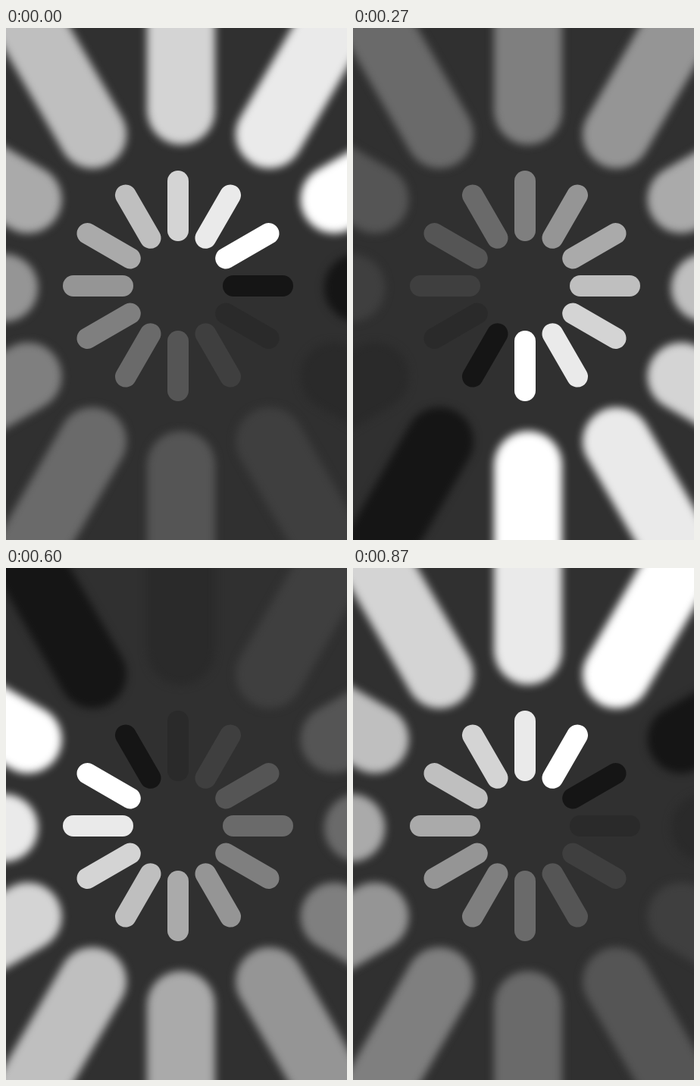
These frames come from a looping animation (450x675 px, 0.94 s). An HTML page:

```html
<!DOCTYPE html>
<html lang="en">
<head>
<meta charset="utf-8">
<title>Spinner</title>
<style>
  html, body { margin: 0; width: 100%; height: 100%; overflow: hidden; background: #303030; }
  svg { display: block; }
  line { stroke-width: 28; stroke-linecap: round; }
  #glow { filter: blur(5.5px); }
</style>
</head>
<body>
<svg width="450" height="675" viewBox="0 0 450 675">
  <g id="glow"><g class="wheel" transform="translate(231 342.5) scale(3.2)"></g></g>
  <g class="wheel" transform="translate(227 340)"></g>
</svg>
<script>
const COUNT = 12, LOOP = 940, FIRST = 2;
// Uneven step times: two of the twelve steps hold twice as long.
const STEPS = [0, 70, 130, 200, 270, 330, 470, 530, 600, 670, 730, 870];

const wheels = [...document.querySelectorAll('.wheel')].map(wheel =>
  Array.from({ length: COUNT }, (_, i) => {
    const bar = document.createElementNS('http://www.w3.org/2000/svg', 'line');
    bar.setAttribute('y1', -73);
    bar.setAttribute('y2', -138);
    bar.setAttribute('transform', `rotate(${i * 360 / COUNT})`);
    return wheel.appendChild(bar);
  }));

let shown = -1;

function paint(step) {
  for (const bars of wheels) {
    bars.forEach((bar, i) => {
      const age = (FIRST + step - i + COUNT) % COUNT;
      const grey = Math.round(255 - age * 21.3);
      bar.setAttribute('stroke', `rgb(${grey},${grey},${grey})`);
    });
  }
}

function tick() {
  const time = performance.now() % LOOP;
  const step = STEPS.findLastIndex(start => start <= time);
  if (step !== shown) paint(shown = step);
  requestAnimationFrame(tick);
}
tick();
</script>
</body>
</html>
```
